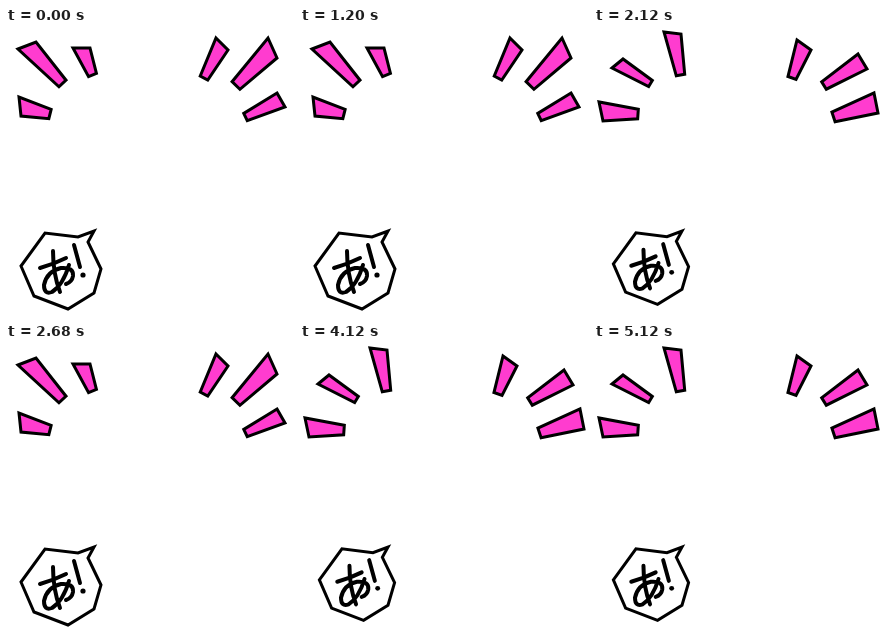
Write an HTML page with a canvas that moves like this. It is 288 px wide and 288 px high and loops after 5320 ms.

```html
<!DOCTYPE html>
<html lang="ja">
<head>
<meta charset="utf-8">
<style>
html, body { margin: 0; width: 100%; height: 100%; overflow: hidden; background: #fff; }
canvas { display: block; width: 288px; height: 288px; }
</style>
</head>
<body>
<canvas id="stage" width="288" height="288"></canvas>
<script>
const ctx = document.getElementById('stage').getContext('2d');
const LOOP = 5320, FPS = 12, TICK = 40, LAST_STEP = 61;
const PINK = '#ff3ccf', OUTLINE = 3, PEN = 4;
const TIP = { x: 88, y: 203 }, SHRINK = 0.94;

// Each ray keeps its inner end; its outer edge swings between two places
const rays = [
  { inner: [56.5, 55.5], outer: [[12, 21, 30, 14], [18, 40, 29, 31]] },
  { inner: [86.5, 47], outer: [[67, 20, 84, 20], [70, 4, 87, 6]] },
  { inner: [44, 86], outer: [[15, 88, 13, 69], [9, 93, 5, 74]] },
  { inner: [198, 50], outer: [[210, 10, 222, 22], [203, 12, 217, 22]] },
  { inner: [230, 57.5], outer: [[262, 10, 271, 30], [264, 26, 273, 41]] },
  { inner: [239.5, 89], outer: [[271, 65, 279, 79], [280, 65, 284, 85]] }
];

const bubble = new Path2D('M88 203 82 214 95 241 88 265 62 281 28 268 15 238 39 205 72 209Z');

// Handwritten lettering: cross bar, stem and loop of the kana, then the mark
const lettering = new Path2D(
  'M34 240Q48 236 60 230' +
  'M47 223Q47 246 54 264' +
  'M63 237Q57 257 46 264Q38 267 38 257Q41 243 55 240Q68 239 67 248Q66 254 60 256' +
  'M68 217 74 239');

function drawRay({ inner: [x, y], outer }, pose) {
  const [ax, ay, bx, by] = outer[pose];
  const dx = x - (ax + bx) / 2, dy = y - (ay + by) / 2;
  // The inner edge is square to the axis and half as wide as the outer one
  const half = Math.hypot(bx - ax, by - ay) / 4 / Math.hypot(dx, dy);
  ctx.beginPath();
  ctx.moveTo(ax, ay);
  ctx.lineTo(bx, by);
  ctx.lineTo(x + dy * half, y - dx * half);
  ctx.lineTo(x - dy * half, y + dx * half);
  ctx.closePath();
  ctx.fillStyle = PINK;
  ctx.fill();
  ctx.stroke();
}

function drawBubble(scale) {
  ctx.save();
  ctx.translate(TIP.x, TIP.y);
  ctx.scale(scale, scale);
  ctx.translate(-TIP.x, -TIP.y);
  ctx.lineWidth = OUTLINE / scale;
  ctx.stroke(bubble);
  ctx.lineCap = ctx.lineJoin = 'round';
  ctx.lineWidth = PEN / scale;
  ctx.stroke(lettering);
  ctx.beginPath();
  ctx.arc(77, 247, 2.6, 0, Math.PI * 2);
  ctx.fillStyle = '#000';
  ctx.fill();
  ctx.restore();
}

function draw(pose) {
  ctx.fillStyle = '#fff';
  ctx.fillRect(0, 0, 288, 288);
  ctx.strokeStyle = '#000';
  ctx.lineWidth = OUTLINE;
  ctx.lineJoin = 'miter';
  rays.forEach(ray => drawRay(ray, pose));
  drawBubble(pose ? SHRINK : 1);
}

// Twelve drawings a second, shown on a 40 ms clock; the last one is held
function stepAt(time) {
  const shown = Math.floor((time % LOOP) / TICK) * TICK;
  return Math.min(LAST_STEP, Math.floor(shown * FPS / 1000));
}

const start = performance.now();
function frame() {
  draw(stepAt(performance.now() - start) % 2);
  requestAnimationFrame(frame);
}
frame();
</script>
</body>
</html>
```
